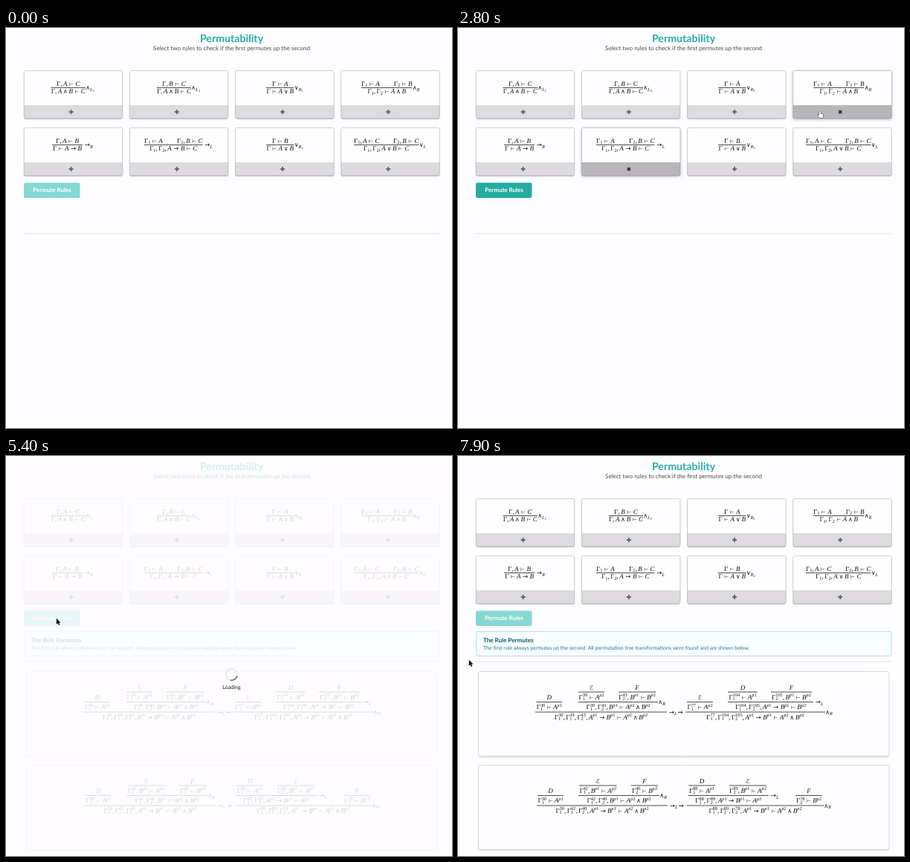
An HTML page with a canvas that plays this animation: 600x539 px, repeating every 8000 ms.

```html
<!DOCTYPE html>
<html lang="en">
<head>
<meta charset="utf-8">
<title>Permutability</title>
<style>
html, body { margin: 0; width: 100%; height: 100%; overflow: hidden; background: #fefdff; }
canvas { display: block; width: 600px; height: 539px; }
</style>
</head>
<body>
<canvas id="stage"></canvas>
<script>
const LOOP = 8000;
const canvas = document.getElementById('stage');
const ratio = window.devicePixelRatio || 1;
canvas.width = 600 * ratio;
canvas.height = 539 * ratio;
const ctx = canvas.getContext('2d');
ctx.textRendering = 'geometricPrecision';

const PAPER = '#fefdff', INK = '#121212', TEAL = '#27aba3';
const BUTTON = { x: 24, y: 208.5, w: 75.5, h: 20.5 };
const SELECT_FIRST = 1200, SELECT_SECOND = 2600, PRESS = 3800, SUBMIT = 4000, DONE = 5400;

// Rules: premises, bar ends, conclusion, label
const RULES = [
  [['Γ,A⊢C'], 60.5, 107, 'Γ,A∧B⊢C', '∧_L~1'],
  [['Γ,B⊢C'], 203, 249, 'Γ,A∧B⊢C', '∧_L~2'],
  [['Γ⊢A'], 350, 387.5, 'Γ⊢A∨B', '∨_R~1'],
  [['Γ_1⊢A', 'Γ_2⊢B'], 478, 546.5, 'Γ_1,Γ_2⊢A∧B', '∧_R'],
  [['Γ,A⊢B'], 62, 103, 'Γ⊢A→B', '→_R'],
  [['Γ_1⊢A', 'Γ_2,B⊢C'], 186, 264.5, 'Γ_1,Γ_2,A→B⊢C', '→_L'],
  [['Γ⊢B'], 350, 387.5, 'Γ⊢A∨B', '∨_R~2'],
  [['Γ_1,A⊢C', 'Γ_2,B⊢C'], 468, 555.5, 'Γ_1,Γ_2,A∨B⊢C', '∨_L'],
];

// Proof steps: level, bar ends, conclusion, then a label or the name of the subproof above
const GOAL = 'A^p1→B^p1⊢A^p2∧B^p2';
const PROOFS = [
  [
    [1, 105.5, 140, 'Γ_1^30⊢A^p1', 'D'],
    [0, 162, 197, 'Γ_1^39⊢A^p2', 'ℰ'],
    [0, 216, 266, 'Γ_2^43,B^p1⊢B^p2', 'F'],
    [1, 162, 269, 'Γ_1^39,Γ_2^43,B^p1⊢A^p2∧B^p2', '∧_R'],
    [2, 104, 281, 'Γ_1^30,Γ_1^39,Γ_2^43,' + GOAL, '→_L'],
    [1, 308, 343, 'Γ_1^77⊢A^p2', 'ℰ'],
    [0, 363, 403, 'Γ_1^104⊢A^p1', 'D'],
    [0, 421, 476, 'Γ_2^105,B^p1⊢B^p2', 'F'],
    [1, 363, 478, 'Γ_1^104,Γ_2^105,A^p1→B^p1⊢B^p2', '→_L'],
    [2, 306, 494, 'Γ_1^77,Γ_1^104,Γ_2^105,' + GOAL, '∧_R'],
  ],
  [
    [1, 107, 142, 'Γ_1^30⊢A^p1', 'D'],
    [0, 163, 213.5, 'Γ_1^42,B^p1⊢A^p2', 'ℰ'],
    [0, 233, 269, 'Γ_2^40⊢B^p2', 'F'],
    [1, 162, 271, 'Γ_1^42,Γ_2^40,B^p1⊢A^p2∧B^p2', '∧_R'],
    [2, 106, 282, 'Γ_1^30,Γ_1^42,Γ_2^40,' + GOAL, '→_L'],
    [0, 310, 346, 'Γ_1^88⊢A^p1', 'D'],
    [0, 365, 415, 'Γ_2^89,B^p1⊢A^p2', 'ℰ'],
    [1, 309.5, 418, 'Γ_1^88,Γ_2^89,A^p1→B^p1⊢A^p2', '→_L'],
    [1, 454, 490, 'Γ_2^78⊢B^p2', 'F'],
    [2, 308, 492, 'Γ_1^88,Γ_2^89,Γ_2^78,' + GOAL, '∧_R'],
  ],
];

// Pointer keyframes: time, x, y
const PATH = [
  [100, 389, 496], [800, 232, 187], [1450, 232, 187], [1800, 325, 153], [2400, 487, 111.5],
  [2900, 487, 111.5], [3600, 67.8, 218.8], [6400, 67.8, 218.8], [7000, 14.7, 274.7],
];

const ARROW = new Path2D('M0 0V8.2L1.9 6.5L3.1 9.3L4.6 8.6L3.4 5.9H5.9Z');
const HAND = new Path2D('M-.9 1Q0-.4 .9 1V4L3.6 4.6Q4.6 5 4.3 6.5L3.6 9.4H-.8L-2.9 6.3Q-3.1 4.9-1.9 5.3L-.9 6.2Z');

const clamp = v => Math.max(0, Math.min(1, v));
const ramp = (t, from, to) => clamp((t - from) / (to - from));
const smooth = p => p * p * (3 - 2 * p);

function text(str, x, y, size, color, weight = 400, align = 'left') {
  ctx.font = `${weight} ${size}px Lato, sans-serif`;
  ctx.fillStyle = color;
  ctx.textAlign = align;
  ctx.fillText(str, x, y);
}

function box(x, y, w, h, radius, fill, stroke) {
  ctx.beginPath();
  ctx.roundRect(x, y, w, h, radius);
  if (fill) { ctx.fillStyle = fill; ctx.fill(); }
  if (stroke) { ctx.strokeStyle = stroke; ctx.lineWidth = 1; ctx.stroke(); }
}

function panel(x, y, w, h, raised) {
  ctx.save();
  ctx.shadowColor = raised ? 'rgba(0,0,0,.3)' : 'rgba(0,0,0,.2)';
  ctx.shadowBlur = (raised ? 4 : 1) * ratio;
  ctx.shadowOffsetY = ratio;
  box(x, y, w, h, 2, PAPER);
  ctx.restore();
}

function line(x1, y1, x2, y2, color, width) {
  ctx.beginPath();
  ctx.moveTo(x1, y1);
  ctx.lineTo(x2, y2);
  ctx.strokeStyle = color;
  ctx.lineWidth = width;
  ctx.stroke();
}

// Symbol scale and the space on either side, in em
const SYMBOLS = {
  '⊢': [.74, .278], '∧': [.9, .19], '∨': [.9, .19], '→': [.95, .278],
  '⇝': [.95, 0], 'ℰ': [.9, 0],
};
const SCRIPTS = { '^': [.7, -.38], '_': [.7, .17], '~': [.5, .3] };
const EM = 9;
const layouts = new Map();

function layout(src) {
  if (layouts.has(src)) return layouts.get(src);
  const glyphs = [];
  let x = 0, scriptStart = 0;
  const put = (ch, size, dy, at) => {
    const scale = SYMBOLS[ch] ? SYMBOLS[ch][0] : 1;
    const face = SYMBOLS[ch] ? '"DejaVu Sans", sans-serif' : '"Liberation Serif", serif';
    const font = `${/[A-Za-z]/.test(ch) ? 'italic ' : ''}${size * scale}px ${face}`;
    ctx.font = font;
    glyphs.push({ ch, font, x: at, dy });
    return at + ctx.measureText(ch).width;
  };
  for (const [, mark, script, ch] of src.matchAll(/([_^~])(\w+)|(.)/g)) {
    if (mark) {
      const [scale, dy] = SCRIPTS[mark];
      let end = mark === '~' ? x : scriptStart;
      for (const c of script) end = put(c, EM * scale, EM * dy, end);
      x = Math.max(x, end);
    } else {
      const pad = x > 0 && SYMBOLS[ch] ? SYMBOLS[ch][1] * EM : 0;
      x = put(ch, EM, 0, x + pad) + pad;
      if (ch === ',') x += .167 * EM;
      scriptStart = x;
    }
  }
  const result = { glyphs, width: x };
  layouts.set(src, result);
  return result;
}

// anchor: 0 left, 0.5 centre, 1 right
function math(src, x, y, anchor = 0) {
  const { glyphs, width } = layout(src);
  ctx.fillStyle = INK;
  ctx.textAlign = 'left';
  for (const g of glyphs) {
    ctx.font = g.font;
    ctx.fillText(g.ch, x - width * anchor + g.x, y + g.dy);
  }
}

function inference(x1, x2, y, conclusion, gap, label) {
  line(x1, y, x2, y, INK, .75);
  math(conclusion, (x1 + x2) / 2, y + gap, .5);
  if (label) math(label, x2 + (label[0] === '→' ? 2.8 : .2), y + 2.7);
}

const cardAt = i => ({ x: 24.2 + 142.2 * (i % 4), y: i < 4 ? 57.5 : 134.5, w: 132.5, h: 64.5 });
const footerOf = c => ({ x: c.x, y: c.y + 46.5, w: c.w, h: 18 });
const inside = (p, r) => p && p.x >= r.x && p.x <= r.x + r.w && p.y >= r.y && p.y <= r.y + r.h;

function drawCard(i, selected, hovered) {
  const c = cardAt(i), f = footerOf(c);
  panel(c.x, c.y, c.w, c.h, selected);
  box(f.x, f.y, f.w, f.h, [0, 0, 2, 2], selected ? '#b8b6b9' : hovered ? '#cac9cb' : '#dddbde');
  box(c.x, c.y, c.w, c.h, 2, null, 'rgba(60,60,64,.22)');

  const cx = c.x + c.w / 2 - 2.8, cy = f.y + 9.1;
  if (selected) {
    line(cx - 2, cy - 2, cx + 2, cy + 2, '#2c2b2d', 1.9);
    line(cx + 2, cy - 2, cx - 2, cy + 2, '#2c2b2d', 1.9);
  } else {
    line(cx - 3, cy, cx + 3, cy, '#5f5e60', 1.8);
    line(cx, cy - 3, cx, cy + 3, '#5f5e60', 1.8);
  }

  const [premises, x1, x2, conclusion, label] = RULES[i];
  const barY = c.y + 23;
  inference(x1, x2, barY, conclusion, 7.8, label);
  if (premises.length === 1) math(premises[0], (x1 + x2) / 2, barY - 2.6, .5);
  else premises.forEach((p, n) => math(p, n ? x2 : x1, barY - 2.6, n));
}

function drawButton(t, enabled, hovered) {
  const fill = !enabled ? '#86d8d4' : t >= PRESS && t < SUBMIT ? '#167e79' : hovered ? '#1c948d' : TEAL;
  box(BUTTON.x, BUTTON.y, BUTTON.w, BUTTON.h, 2, fill);
  text('Permute Rules', 62, 221.3, 8, '#fff', 700, 'center');
}

function drawResults() {
  box(24.5, 236.5, 558.5, 33, 2, '#f6feff', '#bddde2');
  text('The Rule Permutes', 34, 250.6, 8.05, '#13566a', 700);
  text('The first rule always permutes up the second. All permutation tree transformations were found and are shown below.',
    34, 261.2, 7, '#2f7488');
  PROOFS.forEach((steps, n) => {
    const dy = n * 126;
    panel(27.5, 290.5 + dy, 552.5, 114, false);
    box(27.5, 290.5 + dy, 552.5, 114, 2, null, '#d6d5d7');
    for (const [level, x1, x2, conclusion, above] of steps) {
      const y = 318 + 13.5 * level + dy;
      const leaf = above.length === 1;
      inference(x1, x2, y, conclusion, 9.9, leaf ? null : above);
      if (leaf) math(above, (x1 + x2) / 2, y - 3.5, .5);
    }
    math('⇝', 295.5 + n, 348 + dy);
  });
}

function drawLoader(t) {
  const turn = (t - 4700) / 600 * Math.PI * 2;
  const arc = (from, to, color) => {
    ctx.beginPath();
    ctx.arc(303.5, 294.5, 7.6, from, to);
    ctx.strokeStyle = color;
    ctx.lineWidth = 1.4;
    ctx.stroke();
  };
  arc(0, Math.PI * 2, '#dddcde');
  arc(turn - Math.PI / 4, turn + Math.PI / 4, '#626163');
  text('Loading', 303.5, 314, 7.1, '#1c1c1d', 400, 'center');
}

function pointerAt(t) {
  if (t < PATH[0][0]) return null;
  const next = PATH.findIndex(k => k[0] > t);
  if (next < 0) return { x: PATH.at(-1)[1], y: PATH.at(-1)[2] };
  const [t0, x0, y0] = PATH[next - 1], [t1, x1, y1] = PATH[next];
  const p = smooth(ramp(t, t0, t1));
  return { x: x0 + (x1 - x0) * p, y: y0 + (y1 - y0) * p };
}

function drawPointer({ x, y }, hand) {
  ctx.save();
  ctx.translate(x, y);
  ctx.lineJoin = 'round';
  const shape = hand ? HAND : ARROW;
  ctx.strokeStyle = hand ? '#111' : '#fff';
  ctx.lineWidth = hand ? .9 : 1.2;
  ctx.fillStyle = hand ? '#fff' : '#111';
  ctx.stroke(shape);
  ctx.fill(shape);
  ctx.restore();
}

function draw(t) {
  ctx.setTransform(ratio, 0, 0, ratio, 0, 0);
  ctx.fillStyle = PAPER;
  ctx.fillRect(0, 0, 600, 539);

  const pointer = pointerAt(t);
  const done = t >= DONE;
  const enabled = t >= SELECT_SECOND && !done;
  const onButton = enabled && t < SUBMIT && inside(pointer, BUTTON);
  let onFooter = false;

  text('Permutability', 303.5, 18.6, 14.2, TEAL, 700, 'center');
  text('Select two rules to check if the first permutes up the second', 303.5, 30.2, 8, '#4b4a4c', 400, 'center');
  RULES.forEach((_, i) => {
    const selected = !done && (i === 5 && t >= SELECT_FIRST || i === 3 && t >= SELECT_SECOND);
    const hovered = inside(pointer, footerOf(cardAt(i)));
    onFooter = onFooter || hovered;
    drawCard(i, selected, hovered);
  });
  drawButton(t, enabled, onButton);
  line(24, 277, 583.5, 277, '#dddcde', 1);
  if (done) drawResults();

  const dim = ramp(t, SUBMIT, 4400) * (1 - ramp(t, DONE, 5650));
  if (dim > 0) {
    ctx.globalAlpha = dim * .82;
    ctx.fillStyle = PAPER;
    ctx.fillRect(0, 0, 600, 539);
    ctx.globalAlpha = dim;
    drawLoader(t);
    ctx.globalAlpha = 1;
  }
  if (pointer) drawPointer(pointer, onButton || onFooter);
}

const start = performance.now();
function tick() {
  draw((performance.now() - start) % LOOP);
  requestAnimationFrame(tick);
}
tick();
</script>
</body>
</html>
```
